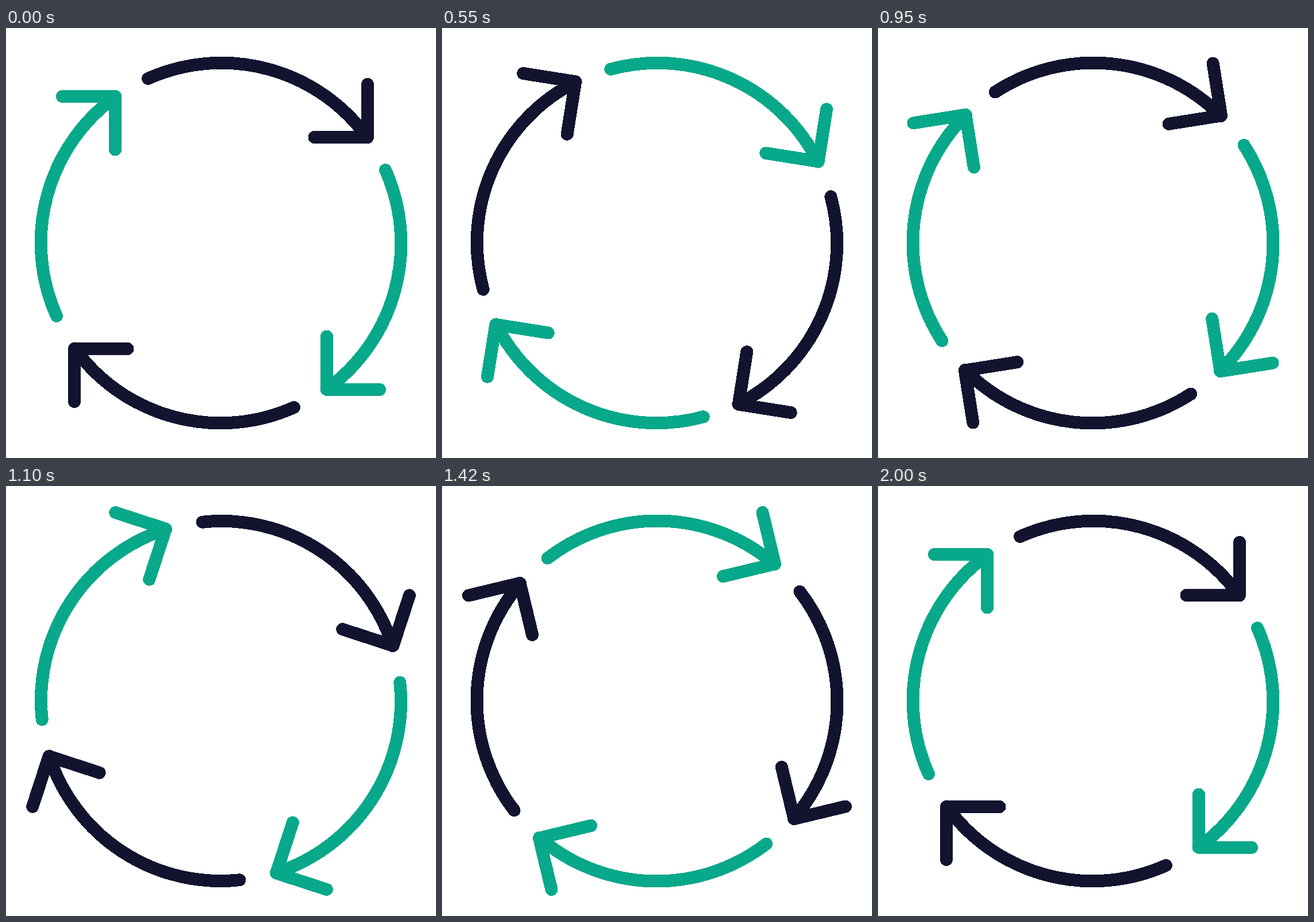
Write an HTML page that moves like this. It is 748x748 px and loops after 2020 ms.

```html
<!DOCTYPE html>
<html lang="en">
<head>
<meta charset="utf-8">
<title>Rotating arrows</title>
<style>
  html, body { margin: 0; width: 100%; height: 100%; overflow: hidden; background: #fff; }
  svg { display: block; width: 100%; height: 100%; }
</style>
</head>
<body>
<svg viewBox="-374 -374 748 748" shape-rendering="crispEdges">
  <defs>
    <path id="arrow" d="M-127 -286A313 313 0 0 1 254.5 -183.5M255 -276V-184H162.5"
      fill="none" stroke-width="22" stroke-linecap="round" stroke-linejoin="round"/>
  </defs>
  <g id="ring">
    <use href="#arrow" stroke="#12132f"/>
    <use href="#arrow" stroke="#08a88a" transform="rotate(90)"/>
    <use href="#arrow" stroke="#12132f" transform="rotate(180)"/>
    <use href="#arrow" stroke="#08a88a" transform="rotate(270)"/>
  </g>
</svg>
<script>
  const LOOP = 2020;
  const STEPS = 80;
  const ring = document.getElementById('ring');

  // Steps come every 25 ms, with start times rounded down to 10 ms.
  function stepAt(ms) {
    const tick = Math.floor(ms / 10);
    return Math.ceil(2 * (tick + 1) / 5) - 1;
  }

  function render(ms) {
    ring.setAttribute('transform', `rotate(${stepAt(ms) * 360 / STEPS})`);
  }

  let start;
  function tick(now) {
    start ??= now;
    render((now - start) % LOOP);
    requestAnimationFrame(tick);
  }

  render(0);
  requestAnimationFrame(tick);
</script>
</body>
</html>
```
